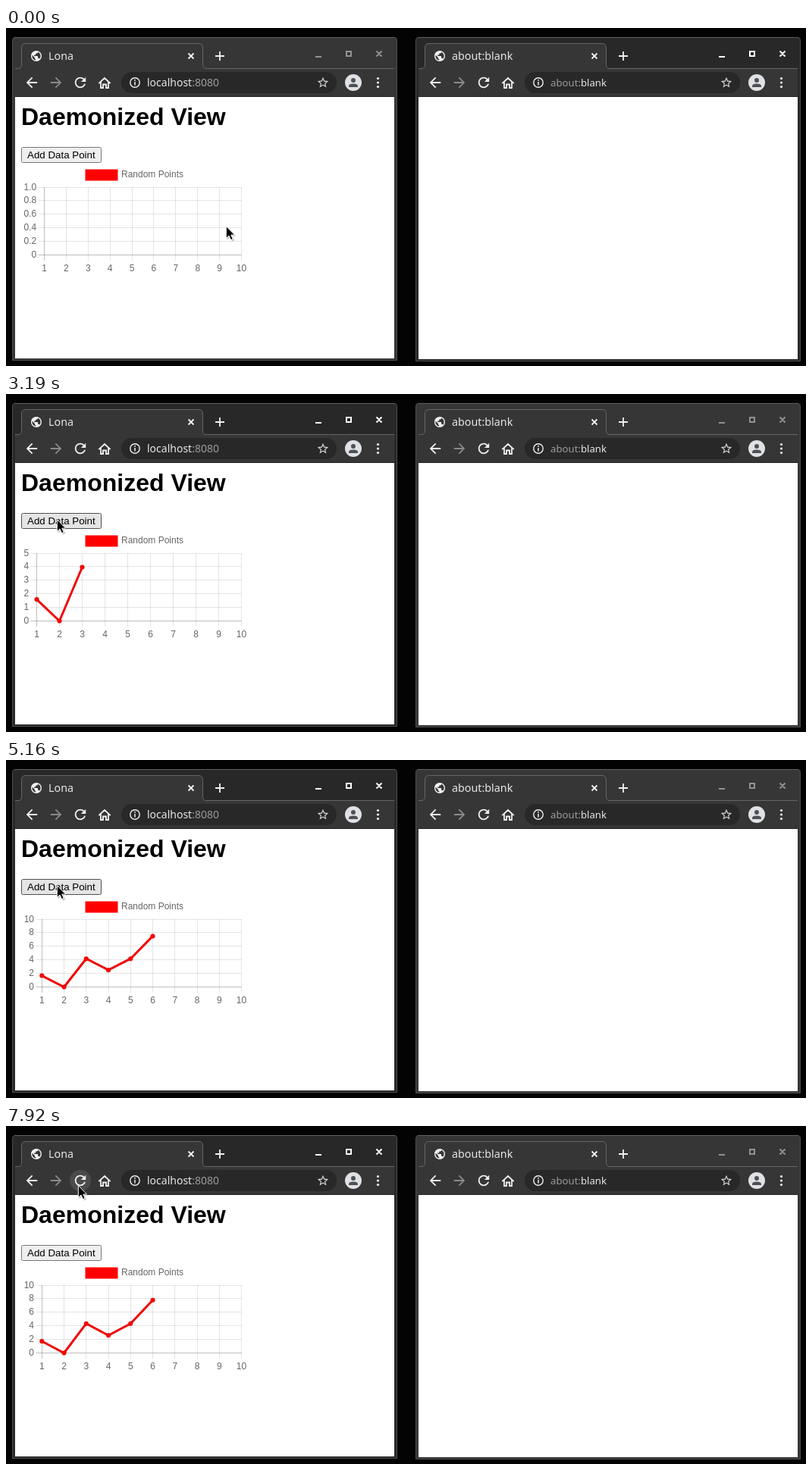
Animation of 1055 by 446 pixels, one loop 8 s. Source, as an HTML page with a canvas:

```html
<!DOCTYPE html>
<html lang="en">
<head>
<meta charset="utf-8">
<title>Daemonized View</title>
<style>
  html, body { margin: 0; width: 100%; height: 100%; overflow: hidden; background: #030303; }
  #stage { position: absolute; left: 0; top: 0; width: 1055px; height: 446px; overflow: hidden; }
  svg, canvas { position: absolute; left: 0; top: 0; }
  text { white-space: pre; }
  .ui { font-family: "Noto Sans", sans-serif; fill: #e8e8e8; }
  .ui .dim { fill: #9c9c9c; }
  .page { font-family: "Liberation Sans", Arial, sans-serif; fill: #000; }
  .frame { fill: #363636; }
  .active .frame { fill: #282828; }
  .controls { stroke: #929292; fill: none; stroke-width: 2; }
  .active .controls { stroke: #fff; }
  .icon { fill: #f1f1f1; }
  .line { fill: none; stroke: #f1f1f1; stroke-width: 1.8; }
  #button rect { fill: #efefef; stroke: #767676; }
  #button.hover rect { fill: #e5e5e5; stroke: #4f4f4f; }
  #button.press rect { fill: #f5f5f5; stroke: #8d8d8d; }
</style>
</head>
<body>
<div id="stage">
  <svg id="scene" width="1055" height="446" viewBox="0 0 1055 446"></svg>
  <canvas id="chart" width="340" height="446"></canvas>
  <svg width="1055" height="446" viewBox="0 0 1055 446">
    <g id="cursor">
      <path d="M1.5 2 V18.5 L5.4 15 L8 20.5 L11.4 19 L8.8 13.6 H13.6 Z" fill="#000" opacity=".22"/>
      <path d="M.3 .5 V16.5 L4 13.1 L6.5 18.6 L9.2 17.4 L6.8 12.1 H11.6 Z" fill="#000" stroke="#fff" stroke-width="1"/>
    </g>
  </svg>
</div>
<script>
const LOOP = 8000;
const $ = id => document.getElementById(id);

const ICONS = {
  back: "M20 11H7.83l5.59-5.59L12 4l-8 8 8 8 1.41-1.41L7.83 13H20v-2z",
  reload: "M17.65 6.35C16.2 4.9 14.21 4 12 4c-4.42 0-7.99 3.58-7.99 8s3.57 8 7.99 8c3.73 0 6.84-2.55 7.73-6h-2.08c-.82 2.33-3.04 4-5.65 4-3.31 0-6-2.69-6-6s2.69-6 6-6c1.66 0 3.14.69 4.22 1.78L13 11h7V4l-2.35 2.35z",
  star: "M22 9.24l-7.19-.62L12 2 9.19 8.63 2 9.24l5.46 4.73L5.82 21 12 17.27 18.18 21l-1.63-7.03L22 9.24zM12 15.4l-3.76 2.27 1-4.28-3.32-2.88 4.38-.38L12 6.1l1.71 4.04 4.38.38-3.32 2.88 1 4.28L12 15.4z",
  globe: "M12 2C6.48 2 2 6.48 2 12s4.48 10 10 10 10-4.48 10-10S17.52 2 12 2zm-1 17.93c-3.95-.49-7-3.85-7-7.93 0-.62.08-1.21.21-1.79L9 15v1c0 1.1.9 2 2 2v1.93zm6.9-2.54c-.26-.81-1-1.39-1.9-1.39h-1v-3c0-.55-.45-1-1-1H8v-2h2c.55 0 1-.45 1-1V7h2c1.1 0 2-.9 2-2v-.41c2.93 1.19 5 4.06 5 7.41 0 2.08-.8 3.97-2.1 5.39z"
};

const icon = (name, x, y, scale, attrs = "") =>
  `<path class="icon" ${attrs} d="${ICONS[name]}" transform="translate(${x} ${y}) scale(${scale}) translate(-12 -12)"/>`;

function browser(id, dx, bottom, title, url) {
  return `<g id="${id}" transform="translate(${dx} 0)">
    <path class="frame" stroke="#4c4c4c" d="M8.5 ${bottom + 2.5} V16 Q8.5 12.5 12 12.5 H512 Q515.5 12.5 515.5 16 V${bottom + 2.5} Z"/>
    <path d="M11 12.5 H513" stroke="#606060"/>
    <rect x="12" y="53" width="500" height="38" fill="#363636"/>
    <path d="M12 53.5 H16 Q20.5 53.5 20.5 48 V26 Q20.5 20.5 26 20.5 H254 Q259.5 20.5 259.5 26 V48 Q259.5 53.5 264 53.5 H512"
      fill="#363636" stroke="#666"/>
    <path d="M12 90.5 H512" stroke="#222"/>
    ${icon("globe", 40, 37, .7, 'data-part="favicon"')}
    <g class="ui"><text x="56" y="42" font-size="14.3">${title}</text>${url}</g>
    <path class="line" d="M240.5 33.5 l7 7 m0 -7 l-7 7 M276 37 h12 m-6 -6 v12"/>
    <path class="controls" d="M408 38 h8 M449 31 h6 v6 h-6 z M488.5 30.5 l7 7 m0 -7 l-7 7"/>
    <circle data-part="ring" cx="98" cy="72" r="14" fill="#4b4b4b" visibility="hidden"/>
    ${icon("back", 34, 72, .9)}
    ${icon("back", 66, 72, -.9, 'style="fill:#8a8a8a"')}
    ${icon("reload", 98, 72, .9)}
    <path class="line" d="M122.3 73.2 L130 66 L137.7 73.2 M125 71 v8 h3 v-4.5 h4 v4.5 h3 v-8"/>
    <rect x="152" y="58" width="284" height="28" rx="14" fill="#282828" style="mix-blend-mode:normal"/>
    <g class="ui">${url}</g>
    <circle class="line" cx="170" cy="72" r="6.2" style="stroke-width:1.4"/>
    <path class="line" d="M170 71 v4.5 M170 68 v1.7" style="stroke-width:1.5"/>
    ${icon("star", 418, 72, .72, 'style="fill:#d6d6d6"')}
    <circle cx="458" cy="72" r="11" fill="#dfe1e5"/>
    <circle cx="458" cy="69" r="3" fill="#4d5156"/>
    <path d="M452 78 v-1.3 q0 -3.2 6 -3.2 t6 3.2 v1.3 z" fill="#4d5156"/>
    ${[66.5, 72, 77.5].map(y => `<circle class="icon" cx="490.5" cy="${y}" r="1.6"/>`).join("")}
    <rect x="12" y="91" width="500" height="${bottom - 91}" fill="#fff"/>
  </g>`;
}

const address = (size, body) => `<text x="186" y="77" font-size="${size}">${body}</text>`;

$("scene").innerHTML =
  browser("left", 0, 436, "Lona", address(14, 'localhost<tspan class="dim">:8080</tspan>')) +
  browser("right", 532, 437, "about:blank", address(13.2, '<tspan class="dim">about:</tspan>blank')) +
  `<path id="spinner" d="M40 31 a6 6 0 0 1 6 6" fill="none" stroke="#b4b8bd" stroke-width="2" visibility="hidden"/>
  <g class="page">
    <text x="20" y="128" font-size="32" font-weight="700">Daemonized View</text>
    <g id="button">
      <rect x="20.5" y="157.5" width="105" height="20" rx="2"/>
      <text x="28" y="172" font-size="13.333">Add Data Point</text>
    </g>
  </g>`;

const favicon = document.querySelector("#left [data-part=favicon]");
const ring = document.querySelector("#left [data-part=ring]");

const VALUES = [2, 0, 5, 3, 5, 9];
const RIGHT = 310.5, TOP = 210, BASE = 299.5;
const AXES = {
  unit: { max: 1, step: .2, left: 50.5 },
  two: { max: 2, step: .5, left: 50.5 },
  five: { max: 5, step: 1, left: 40.5 },
  ten: { max: 10, step: 2, left: 47.3 }
};
// Each run redraws the chart and lets its points rise from the base line.
const RUNS = [
  [0, 0, "unit"], [1740, 1, "two"], [2240, 2, "two"], [2830, 3, "five"], [3475, 4, "five"],
  [4025, 5, "five"], [4765, 6, "ten"], [6680, 6, "ten"], [7490, 6, "ten"]
];
const PRESSES = [[2165, 2240], [2740, 2830], [3340, 3475], [3920, 4025], [4680, 4765]];
const MOVES = [
  [690, 1370, 290, 261, 57, 161],
  [1640, 1740, 57, 161, 67, 165],
  [5330, 5980, 67, 165, 95, 78]
];
const DELAY = 35, RISE = 1000;

const clamp = v => Math.min(1, Math.max(0, v));
const outQuart = t => 1 - (1 - t) ** 4;
const inOut = t => t * t * (3 - 2 * t);
const within = (t, [from, to]) => t >= from && t < to;
const show = (el, on) => el.setAttribute("visibility", on ? "visible" : "hidden");

const ctx = $("chart").getContext("2d");

function rule(x1, y1, x2, y2, alpha) {
  ctx.strokeStyle = `rgba(0,0,0,${alpha})`;
  ctx.lineWidth = 1;
  ctx.beginPath();
  ctx.moveTo(x1, y1);
  ctx.lineTo(x2, y2);
  ctx.stroke();
}

function label(str, x, y, align) {
  ctx.textAlign = align;
  ctx.fillText(str, x, y);
}

function drawAxes({ max, step, left }) {
  const gap = (RIGHT - left) / 9, rows = Math.round(max / step);
  ctx.font = '12px "Liberation Sans", Arial, sans-serif';
  ctx.fillStyle = "#666";
  for (let i = 0; i < 10; i++) {
    const x = left + i * gap, px = Math.floor(x) + .5;
    rule(px, TOP, px, 307, i ? .1 : .25);
    label(i + 1, x, 321, "center");
  }
  for (let i = 0; i <= rows; i++) {
    const y = BASE - i * (BASE - TOP) / rows;
    rule(left - 8, Math.floor(y) + .5, RIGHT, Math.floor(y) + .5, i ? .1 : .25);
    label(i ? (i * step).toFixed(step < 1 ? 1 : 0) : "0", left - 10.3, Math.floor(y) + 4, "right");
  }
  label("Random Points", 152, 197, "left");
  ctx.fillStyle = "#f00";
  ctx.fillRect(104.5, 186.5, 43, 15);
}

function drawPoints(count, { max, left }, progress) {
  const gap = (RIGHT - left) / 9;
  const points = VALUES.slice(0, count).map((v, i) =>
    [left + i * gap, BASE - v / max * (BASE - TOP) * progress]);
  ctx.strokeStyle = "#f00808";
  ctx.lineWidth = 3;
  ctx.beginPath();
  points.forEach(p => ctx.lineTo(...p));
  ctx.stroke();
  ctx.fillStyle = "#f00";
  ctx.strokeStyle = "rgba(0,0,0,.1)";
  ctx.lineWidth = 1;
  for (const [x, y] of points) {
    ctx.beginPath();
    ctx.arc(x, y, 3, 0, 2 * Math.PI);
    ctx.fill();
    ctx.stroke();
  }
}

function drawChart(t) {
  const [start, count, name] = RUNS.filter(run => run[0] <= t).pop();
  ctx.clearRect(0, 0, 340, 446);
  drawAxes(AXES[name]);
  drawPoints(count, AXES[name], outQuart(clamp((t - start - DELAY) / RISE)));
}

function pointer(t) {
  const [from, to, x1, y1, x2, y2] = MOVES.filter(m => m[0] <= t).pop() || MOVES[0];
  const k = inOut(clamp((t - from) / (to - from)));
  return [Math.round(x1 + (x2 - x1) * k), Math.round(y1 + (y2 - y1) * k)];
}

function render(t) {
  const [x, y] = pointer(t);
  const hover = x >= 20 && x < 126 && y >= 157 && y < 178;
  const loading = within(t, [6320, 6640]);
  $("cursor").setAttribute("transform", `translate(${x} ${y})`);
  $("button").setAttribute("class", PRESSES.some(p => within(t, p)) ? "press" : hover ? "hover" : "");
  $("left").setAttribute("class", t >= 1640 ? "active" : "");
  $("right").setAttribute("class", t < 1640 ? "active" : "");
  show(favicon, !loading);
  show($("spinner"), loading);
  $("spinner").setAttribute("transform", `rotate(${-t * .36} 40 37)`);
  show(ring, t >= 6320);
  drawChart(t);
}

const begin = performance.now();
function tick() {
  render((performance.now() - begin) % LOOP);
  requestAnimationFrame(tick);
}
tick();
</script>
</body>
</html>
```
